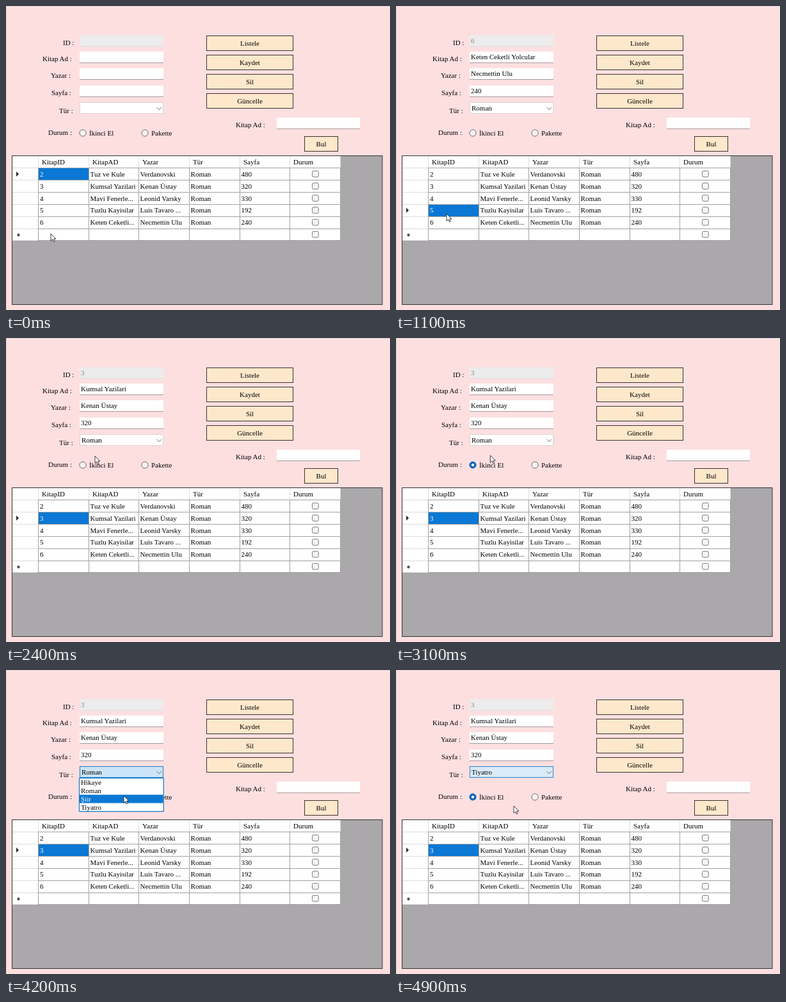
Recreate the animation shown at these times as an HTML page. Size 600x474 px, loop 5000 ms.

```html
<!DOCTYPE html>
<html lang="tr">
<head>
<meta charset="utf-8">
<title>Kitap formu</title>
<style>
  html, body { margin: 0; width: 100%; height: 100%; overflow: hidden; background: #fddfe0; }
  svg { display: block; width: 600px; height: 474px; }
  text { font: 11px "Liberation Serif", "Times New Roman", serif; fill: #000; white-space: pre; }
</style>
</head>
<body>
<svg id="stage" viewBox="0 0 600 474" xmlns="http://www.w3.org/2000/svg"></svg>
<script>
const LOOP = 5000, STEP = 100;
const stage = document.getElementById('stage');

function add(tag, attrs, parent = stage, content) {
  const el = document.createElementNS('http://www.w3.org/2000/svg', tag);
  for (const k in attrs) el.setAttribute(k, attrs[k]);
  if (content !== undefined) el.textContent = content;
  parent.appendChild(el);
  return el;
}
const rect = (x, y, width, height, fill, more = {}, parent) =>
  add('rect', { x, y, width, height, fill, ...more }, parent);
const text = (x, y, str, more = {}, parent) => add('text', { x, y, ...more }, parent, str);
const line = (x1, y1, x2, y2, stroke) => add('line', { x1, y1, x2, y2, stroke });
const show = (el, on) => el.setAttribute('visibility', on ? 'visible' : 'hidden');

const books = [
  { id: 2, cell: 'Tuz ve Kule', title: 'Tuz ve Kule', by: 'Verdanovski', pages: 480 },
  { id: 3, cell: 'Kumsal Yazilari', title: 'Kumsal Yazilari', by: 'Kenan Üstay', pages: 320 },
  { id: 4, cell: 'Mavi Fenerle...', title: 'Mavi Fenerlerin Gölgesinde', by: 'Leonid Varsky', pages: 330 },
  { id: 5, cell: 'Tuzlu Kayisilar', title: 'Tuzlu Kayisilar', by: 'Luis Tavaro ...', pages: 192 },
  { id: 6, cell: 'Keten Ceketli...', title: 'Keten Ceketli Yolcular', by: 'Necmettin Ulu', pages: 240 }
];

// Window and form
rect(0, 0, 600, 474, '#fddfe0');
rect(0, 0, 600, 1, '#e5d3d7');
rect(0, 0, 1, 474, '#e3c9cb');

[[89, 61, 'ID :'], [57, 86, 'Kitap Ad :'], [70, 112, 'Yazar :'], [71, 138.5, 'Sayfa :'],
 [83, 167, 'Tür :'], [66, 201, 'Durum :'], [359, 189, 'Kitap Ad :']]
  .forEach(([x, y, s]) => text(x, y, s));

function input(x, y, fill, edge, w = 131) {
  rect(x, y, w, 18, fill);
  rect(x, y + 17, w, 1, edge);
  return text(x + 2, y + 12, '');
}
const idBox = input(115, 45.5, '#ececec', '#e0dcdc');
idBox.style.fill = '#8a8788';
const titleBox = input(115, 71, '#fff', '#a79a9b');
const byBox = input(115, 97, '#fff', '#a79a9b');
const pagesBox = input(115, 124, '#fff', '#a79a9b');
input(423, 174, '#fff', '#a79a9b', 130);

function button(x, y, w, label) {
  rect(x + .5, y + .5, w, 23, '#fee8cb', { stroke: '#3b3232' });
  text(x + w / 2 + .5, y + 16, label, { 'text-anchor': 'middle' });
}
['Listele', 'Kaydet', 'Sil', 'Güncelle'].forEach((s, i) => button(313, 46 + 30 * i, 135, s));
button(466, 203, 52, 'Bul');

function radio(x, label) {
  const ring = add('circle', { cx: x, cy: 198, r: 5.1, fill: '#fbf3f3', stroke: '#6f6a6b' });
  text(x + 10, 202, label);
  return ring;
}
const usedRing = radio(120, 'İkinci El');
radio(217, 'Pakette');
const usedDot = add('circle', { cx: 120, cy: 198, r: 2.2, fill: '#fff' });

// Grid
const cols = [50, 129, 207, 286, 365, 443, 522];
const PITCH = 18.85;
const lineY = i => Math.round(252.3 + PITCH * i);
const midY = i => 261.9 + PITCH * i;
rect(9.5, 233.5, 578.5, 232, '#aaa8ab', { stroke: '#353334' });
rect(10, 234, 513, 132, '#fff');
['KitapID', 'KitapAD', 'Yazar', 'Tür', 'Sayfa', 'Durum']
  .forEach((s, i) => text(cols[i] + 6, 247, s));
const selection = rect(50, 0, 79, 19, '#0a78d4');
for (let i = 0; i < 7; i++) {
  const y = lineY(i) + .5;
  line(10, y, 50, y, '#dedcdd');
  line(50, y, 523, y, '#a3a1a2');
}
cols.forEach(x => {
  line(x + .5, 234, x + .5, 252, '#dedcdd');
  line(x + .5, 252, x + .5, 366, '#a3a1a2');
});
const idCells = books.map((b, i) => {
  const y = midY(i) + 3.9;
  const cell = text(53, y, b.id);
  [b.cell, b.by, 'Roman', b.pages].forEach((s, c) => text(cols[c + 1] + 2.6, y, s));
  return cell;
});
for (let i = 0; i < 6; i++)
  rect(478.5, midY(i) - 4.7, 9.8, 9.4, '#f6f5f6', { rx: 2, stroke: '#7d7a7b' });
const marker = add('path', { d: 'M16 -4 L20 0 L16 4 Z', fill: '#2b292a' });
add('circle', { cx: 19.5, cy: 357, r: 2.2, fill: '#555354' });

// Combo box with its drop-down
const listClip = add('clipPath', { id: 'below' });
rect(100, 168, 170, 70, '#000', {}, listClip);
const listHolder = add('g', { 'clip-path': 'url(#below)' });
const list = add('g', {}, listHolder);
const shadow = rect(121, 221, 126, 5, '#6b5556', { opacity: .55 }, list);
rect(114.5, 168.5, 131.7, 52, '#fff', { stroke: '#1f7cc8', 'stroke-width': 1.3 }, list);
const hover = rect(115, 0, 130.6, 13, '#0a78d4', {}, list);
const items = ['Hikaye', 'Roman', 'Şiir', 'Tiyatro']
  .map((s, i) => text(117, 178.5 + 13 * i, s, {}, list));

const combo = rect(115.5, 150.5, 130, 17, '#fff');
const kind = text(118, 163, '');
add('path', { d: 'M235.5 158l3.8 3.7l3.8 -3.7', fill: 'none', stroke: '#6d6a6b' });

const cursor = add('path', {
  d: 'M0 0V11.2L2.6 8.8L4.3 12.7L6.2 11.9L4.5 8.1H8Z',
  fill: '#fff', stroke: '#2c2627', 'stroke-width': .9, 'stroke-linejoin': 'round'
});

const comboLook = {
  idle: ['#fff', '#ddd4d5'],
  hot: ['#e2f0fb', '#2a86d1'],
  open: ['#cce4f7', '#1f7cc8'],
  focus: ['#d9eaf8', '#2a86d1']
};

// Each entry changes part of the state from its time on
const events = [
  [0, { row: 0, book: -1, kind: '', combo: 'idle', used: false, list: 0, item: -1 }],
  [800, { row: 4 }],
  [900, { book: 4, kind: 'Roman' }],
  [1100, { row: 3 }],
  [1200, { book: 3 }],
  [1400, { row: 2 }],
  [1500, { book: 2 }],
  [1700, { row: 1 }],
  [1800, { book: 1 }],
  [2800, { used: true }],
  [3400, { combo: 'hot' }],
  [3700, { list: 10, item: 1 }],
  [3800, { list: 53, combo: 'open' }],
  [4200, { item: 2 }],
  [4400, { item: 3 }],
  [4600, { list: 0, kind: 'Tiyatro', combo: 'focus' }]
];

// Pointer path: time, x, y
const path = [
  [0, 70, 355], [300, 68, 364], [600, 71, 345], [700, 71, 345], [800, 73, 338],
  [1000, 78, 328], [1100, 79, 324], [1200, 79, 320], [1400, 81, 300], [1500, 81, 296],
  [1600, 82, 282], [1900, 83, 278], [2100, 100, 244], [2400, 139, 184], [2700, 122, 195],
  [2900, 122, 195], [3200, 160, 177], [3500, 200, 162], [3800, 200, 162],
  [4000, 190, 182], [4200, 184, 196], [4400, 184, 211], [4900, 184, 212]
];

function pointAt(t) {
  const i = path.findIndex(p => p[0] >= t);
  if (i <= 0) return path[0].slice(1);
  const [a, b] = [path[i - 1], path[i]];
  const k = (t - a[0]) / (b[0] - a[0]);
  return [1, 2].map(n => a[n] + (b[n] - a[n]) * k);
}

function draw(t) {
  const s = Object.assign({}, ...events.filter(e => e[0] <= t).map(e => e[1]));
  const book = books[s.book] || { id: '', title: '', by: '', pages: '' };
  idBox.textContent = book.id;
  titleBox.textContent = book.title;
  byBox.textContent = book.by;
  pagesBox.textContent = book.pages;
  kind.textContent = s.kind;

  selection.setAttribute('y', lineY(s.row) + .5);
  marker.setAttribute('transform', `translate(0 ${midY(s.row)})`);
  idCells.forEach((c, i) => c.style.fill = i === s.row ? '#fff' : '');

  usedRing.setAttribute('fill', s.used ? '#0b66b8' : '#fbf3f3');
  usedRing.setAttribute('stroke', s.used ? '#0b66b8' : '#6f6a6b');
  show(usedDot, s.used);

  const [fill, stroke] = comboLook[s.combo];
  combo.setAttribute('fill', fill);
  combo.setAttribute('stroke', stroke);
  show(listHolder, s.list > 0);
  list.setAttribute('transform', `translate(0 ${s.list - 53})`);
  shadow.setAttribute('opacity', s.list < 53 ? .55 : 0);
  hover.setAttribute('y', 168.5 + 13 * Math.max(s.item, 0));
  items.forEach((el, i) => el.style.fill = i === s.item ? '#fff' : '');

  cursor.setAttribute('transform', `translate(${pointAt(t).join(' ')})`);
}

function tick() {
  draw(Math.floor(performance.now() % LOOP / STEP) * STEP);
  requestAnimationFrame(tick);
}
tick();
</script>
</body>
</html>
```
